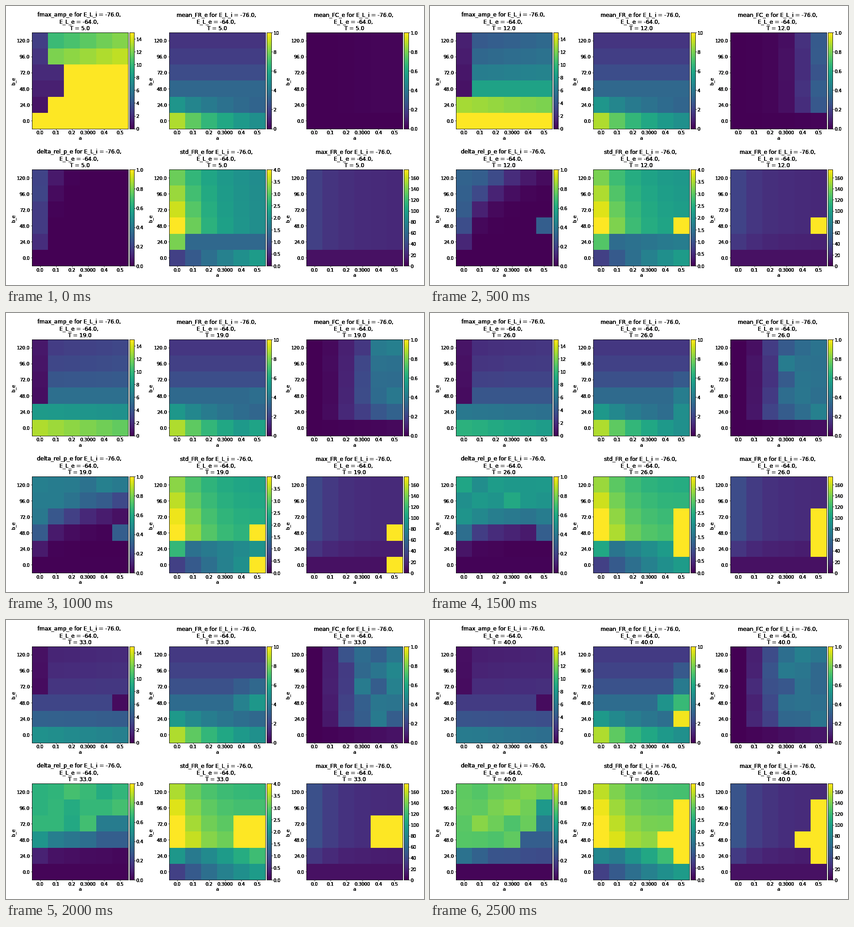
Write a matplotlib script that moves like this. It is 917 px wide and 611 px high and loops after 3000 ms.

```python
import numpy as np
import matplotlib.pyplot as plt
from matplotlib.animation import FuncAnimation

W, H, DPI = 917, 611, 64
PX = 72 / DPI                      # points per pixel
SIDE, BAR, GAP = 210.6, 10.5, 3.2
STEPS = 6

a = np.arange(6)[None, :]          # column index, left to right
b = np.arange(5, -1, -1)[:, None]  # row index, top to bottom

# step, lowest row, highest row, first column of each block of bursting cells
BURSTS = [(1, 2, 2, 5), (2, 2, 2, 5), (2, 0, 0, 5), (3, 1, 3, 5),
          (4, 2, 3, 4), (5, 1, 4, 5), (5, 2, 2, 4)]


def period(k):
    return 5 + 7 * k


def burst(k):
    mask = np.zeros((6, 6), bool)
    for step, low, high, first in BURSTS:
        if step == k:
            mask |= (b >= low) & (b <= high) & (a >= first)
    return mask


def noise(k, size):
    return 1 + size * np.random.default_rng(k).standard_normal((6, 6))


def logistic(x):
    return 1 / (1 + np.exp(-x))


def amplitude(k):
    """Falls with the period; a quiet patch stays near zero."""
    value = (46 + 184 * 0.56 ** b) / period(k) * (1 + 0.015 * (b - 2) * (a - 3))
    if k == 0:
        quiet = (b > a) & (b < 6 - 2 * a)
    elif k < 4:
        quiet = (a == 0) & (b > 1)
    else:
        quiet = (a == 0) & (b > 2) | (a == 5) & (b == 2)
    return np.where(quiet, 0.3 + 2.5 * b / period(k), value)


def mean_rate(k):
    excess = 7.6 * 0.53 ** b / (1 + 0.2 * a * (b < 2))
    drift = 0.04 * k * (b > 0)
    return 1.2 + excess + drift + burst(k) * 0.4 * (a - 3) * (k - 1) ** 2 * 0.5 ** b


def correlation(k):
    """A front that moves from right to left as the period grows."""
    front = 0.9 + 4 / (k + 0.1)
    value = 0.38 * logistic(1.5 * (a - front)) * noise(k, 0.12) + 0.003 * a
    return np.where(b > 0, value, 0.0024 * k * a) * (a > 0)


def rel_power(k):
    """A plateau that rises and spreads down and to the right."""
    front = 1.8 - 0.16 * (k - 2.8) ** 2 + 5 * 0.45 ** k * np.sqrt(a)
    value = (0.2 + 0.115 * k) * logistic((1.2 + 0.5 * k) * (b - front))
    value = np.where(b > 0, value * noise(k, 0.04), 0.003 * k)
    return np.where(burst(k) & (b > 1), 0.06 + 0.12 * b, value)


def std_rate(k):
    upper = (1.8 + 1.3 * 0.65 ** a + 0.3 * (5 - b) * 0.5 ** a
             + k * (0.1 + 0.015 * a * (1 + 0.5 * (5 - b))))
    second = np.where(a == 0, 3.2 - 0.27 * k, 1.35 + 0.07 * k * a)
    lowest = 0.75 + 0.4 * a - 0.022 * a ** 2
    value = np.where(b > 1, upper, np.where(b == 1, second, lowest))
    return np.where(burst(k), 4, value)


def max_rate(k):
    value = 20 + (13 + 2.5 * k) * 0.5 ** a
    value = np.where(b == 1, value * (0.65 + 0.35 * 0.4 ** k), value)
    return np.where(burst(k), 175, np.where(b == 0, 8, value))


# name, field, colour limit, colour bar step, label format
PANELS = [
    ("fmax_amp_e", amplitude, 15, 2, ".0f"),
    ("mean_FR_e", mean_rate, 10, 2, ".0f"),
    ("mean_FC_e", correlation, 1, 0.2, ".1f"),
    ("delta_rel_p_e", rel_power, 1, 0.2, ".1f"),
    ("std_FR_e", std_rate, 4, 0.5, ".1f"),
    ("max_FR_e", max_rate, 175, 20, ".0f"),
]

fig = plt.figure(figsize=(W / DPI, H / DPI), dpi=DPI, facecolor="white")
stage = fig.add_axes([0, 0, 1, 1], zorder=5)
stage.set(xlim=(0, W), ylim=(H, 0))
stage.axis("off")


def label(x, y, text, size=10, **kw):
    """Text laid down several times, which gives it heavy edges."""
    return [stage.text(x, y, text, fontsize=size * PX, family="DejaVu Sans", **kw)
            for _ in range(6)]


def box(x, y, w, h):
    ax = fig.add_axes([x / W, 1 - (y + h) / H, w / W, h / H])
    ax.tick_params(length=2.5 * PX, width=0.8 * PX,
                   labelleft=False, labelright=False, labelbottom=False)
    for spine in ax.spines.values():
        spine.set_linewidth(0.9 * PX)
    return ax


def title(name, k):
    return f"{name} for E_L_i = -76.0, \nE_L_e = -64.0, \nT = {period(k):.1f}"


def make_panel(i, name, field, vmax, gap, fmt):
    x, y = 57 + 301 * (i % 3), 58 + 300.3 * (i // 3)
    bottom, mid = y + SIDE, x + SIDE / 2
    ax = box(x, y, SIDE, SIDE)
    image = ax.imshow(field(0), cmap="viridis", vmin=0, vmax=vmax,
                      aspect="auto", interpolation="nearest")
    ax.set(xticks=range(6), yticks=range(6))
    for j in range(6):
        at = (j + 0.5) * SIDE / 6
        a_text = "0.3000" if j == 3 else f"{j / 10:.1f}"
        label(x + at, bottom + 4.7, a_text, ha="center", va="top")
        label(x - 5, y + at + 0.7, f"{24 * (5 - j):.1f}",
              ha="right", va="center_baseline")
    label(mid, bottom + 16, "a", ha="center", va="top")
    label(x - 34.5, y + SIDE / 2 + 1.5, "b_e", ha="center", va="bottom",
          rotation=90, rotation_mode="anchor")

    left = x + SIDE + GAP
    bar = box(left, y, BAR, SIDE)
    bar.imshow(np.linspace(0, 1, 256)[:, None], cmap="viridis", aspect="auto",
               origin="lower", extent=(0, 1, 0, vmax))
    ticks = np.arange(0, vmax + 1e-6, gap)
    bar.set(xticks=[], yticks=ticks)
    bar.yaxis.tick_right()
    bar.tick_params(labelright=False)
    for t in ticks:
        label(left + BAR + 4.3, bottom - SIDE * t / vmax + 0.7, format(t, fmt),
              ha="left", va="center_baseline")

    heads = label(mid, y - 5.2, title(name, 0), size=12, ha="center", va="baseline")
    return image, heads


parts = [make_panel(i, *panel) for i, panel in enumerate(PANELS)]


def update(k):
    for (name, field, *_), (image, heads) in zip(PANELS, parts):
        image.set_data(field(k))
        for head in heads:
            head.set_text(title(name, k))
    return []


anim = FuncAnimation(fig, update, frames=STEPS, interval=500, repeat=True,
                     repeat_delay=0, blit=False)
plt.show()
```
